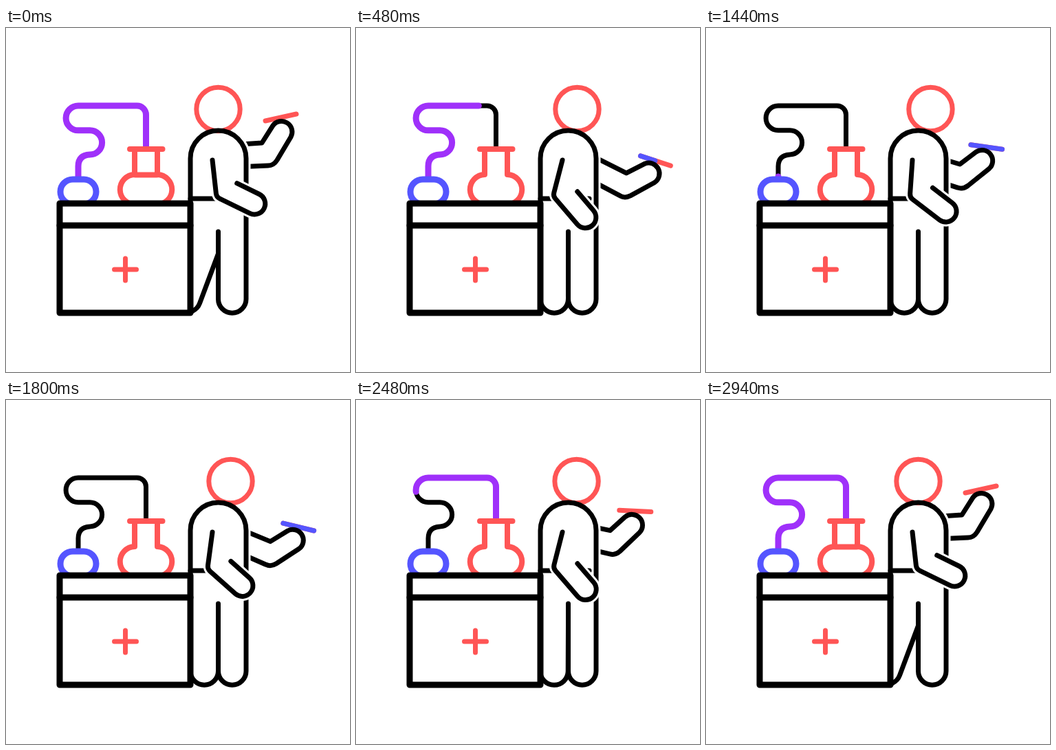
An HTML page that plays this animation: 500x500 px, repeating every 3 s.

```html
<!DOCTYPE html>
<html lang="en">
<head>
<meta charset="utf-8">
<title>Laboratory</title>
<style>
  html, body { margin: 0; width: 100%; height: 100%; overflow: hidden; background: #fff; }
  svg { display: block; width: 100%; height: 100%; }
  svg * { fill: none; stroke: #000; stroke-width: 7; stroke-linecap: round; stroke-linejoin: round; }
  .red { stroke: #ff5555; }
  .blue { stroke: #5555ff; }
  .purple { stroke: #9f30fa; }
  .thick { stroke-width: 9; }
  .glass { stroke-width: 8; }
  .solid { fill: #fff; }
  .halo { fill: #fff; stroke: #fff; stroke-width: 13; }
</style>
</head>
<body>
<svg viewBox="0 0 500 500">
  <path class="tube"/>
  <path class="tube purple thick" id="fluid" pathLength="1"/>
  <path class="blue thick" d="M97 256a18 18 0 0 1 0-36H113a18 18 0 0 1 0 36z"/>
  <path class="red glass" d="M180 176H227.500M187 176V213A21.500 21.500 0 0 0 188 256.500H219A21.500 21.500 0 0 0 220 213V176"/>
  <path class="red glass" id="level"/>

  <g id="backArm">
    <path class="red" d="M5-32L50-42"/>
    <path class="blue" id="ink" pathLength="1" d="M5-32L50-42"/>
    <path class="solid" d="M-60 4L0 0L15.9-25.2A15.5 15.5 0 0 1 42.1-8.8L22 25Q17 33 9 33L-60 36"/>
  </g>

  <path class="halo" d="M268 394V189.5a40.5 40.5 0 0 1 81 0V394z"/>
  <circle class="red" id="head" cy="118" r="31.700"/>
  <path id="leg"/>
  <path d="M268 255V189.5a40.5 40.5 0 0 1 81 0V394a20.25 20.25 0 0 1-40.5 0V296"/>
  <path d="M268 248H339"/>
  <path class="halo frontArm"/>
  <path class="frontArm"/>

  <path class="solid thick" d="M78 255H268V414H78z"/>
  <path class="thick" d="M78 287H268"/>
  <path class="red" d="M157.500 351H189.500M173.500 335V367"/>
</svg>
<script>
const $ = id => document.getElementById(id);
const setAll = (name, d) => document.querySelectorAll('.' + name).forEach(e => e.setAttribute('d', d));
const rad = deg => deg * Math.PI / 180;
const mix = (a, b, p) => a + (b - a) * p;

// Eased progress of t between two times
function ease(t, from, to) {
  const x = Math.min(1, Math.max(0, (t - from) / (to - from)));
  return x * x * (3 - 2 * x);
}

// Values at evenly spaced beats
const BEAT = 490;
function onBeat(values, t) {
  const i = Math.min(values.length - 2, Math.floor(t / BEAT));
  return mix(values[i], values[i + 1], ease(t, i * BEAT, (i + 1) * BEAT));
}

const HEAD = [308.5, 321.5, 321.5, 326.5, 326.5, 320.7, 308.5];
const REACH = [1, 0, 0.36, 0.51, 0.27, 0, 1];
const STRIDE = [1, 0, 0, 0, 0, 0, 1];

// time, elbow x, elbow y, rotation, sideways bow of the path to the next pose
const BACK = [
  [0, 372, 167, 0, -58],
  [490, 393, 211, 30.5, 0],
  [735, 395, 211, 30.2, 0],
  [1225, 369, 198, 20.5, 0],
  [1500, 369, 198, 20.5, 0],
  [2040, 395, 211, 30.2, -58],
  [2940, 372, 167, 0, 0]
];

function backArm(t) {
  let i = 0;
  while (i < BACK.length - 2 && t >= BACK[i + 1][0]) i++;
  const a = BACK[i], b = BACK[i + 1], p = ease(t, a[0], b[0]);
  const x = mix(a[1], b[1], p) + a[4] * p * (1 - p);
  $('backArm').setAttribute('transform',
    `translate(${x} ${mix(a[2], b[2], p)}) rotate(${mix(a[3], b[3], p)})`);
}

function frontArm(u) {
  const upper = rad(mix(-14.5, 6.3, u)), fore = rad(mix(49.5, 26, u));
  const c = Math.cos(fore), s = Math.sin(fore);
  const ex = 300 + 54 * Math.sin(upper), ey = 192 + 54 * Math.cos(upper);
  // Point along the forearm and across it
  const at = (l, w) => `${ex + l * c + w * s} ${ey + l * s - w * c}`;
  const bx = ex - 5 * Math.sin(upper), by = ey - 5 * Math.cos(upper);
  setAll('frontArm', `M300 192L${bx} ${by}Q${ex} ${ey} ${at(5, 0)}L${at(54, 0)}` +
    `A15.5 15.5 0 0 0 ${at(54, 31)}L${at(18, 31)}`);
}

// Show only the part of a unit-length path between two fractions
function trim(el, from, to) {
  el.style.display = to - from > 0.001 ? '' : 'none';
  el.style.strokeDasharray = `${to - from} 2`;
  el.style.strokeDashoffset = -from;
}

function draw(t) {
  const stride = onBeat(STRIDE, t);
  $('head').setAttribute('cx', onBeat(HEAD, t));
  frontArm(onBeat(REACH, t));
  backArm(t);

  $('leg').setAttribute('d', `M308.5 328V${394 + 11 * stride}a20.25 20.25 0 0 1-40.5 0`);
  $('leg').setAttribute('transform', `rotate(${20.5 * stride} 308.5 328)`);

  const y = mix(256.5, 213.5, stride);
  const half = 15.5 + Math.sqrt(Math.max(0, 21.5 ** 2 - (y - 235) ** 2));
  $('level').setAttribute('d', `M${203.5 - half} ${y}H${203.5 + half}`);

  if (t < 1700) trim($('fluid'), ease(t, 0, 1490), 1);
  else trim($('fluid'), 0, ease(t, 1945, 2930));
  trim($('ink'), 0, ease(t, 0, 980) - ease(t, 2150, 2450));
}

setAll('tube', 'M203.5 173V126a13 13 0 0 0-13-13H105a17.9 17.9 0 0 0 0 35.8H122' +
  'a17.6 17.6 0 0 1 0 35.2Q105 185 105 201V217');

function tick(now) {
  draw(now % 3000);
  requestAnimationFrame(tick);
}
draw(0);
requestAnimationFrame(tick);
</script>
</body>
</html>
```
